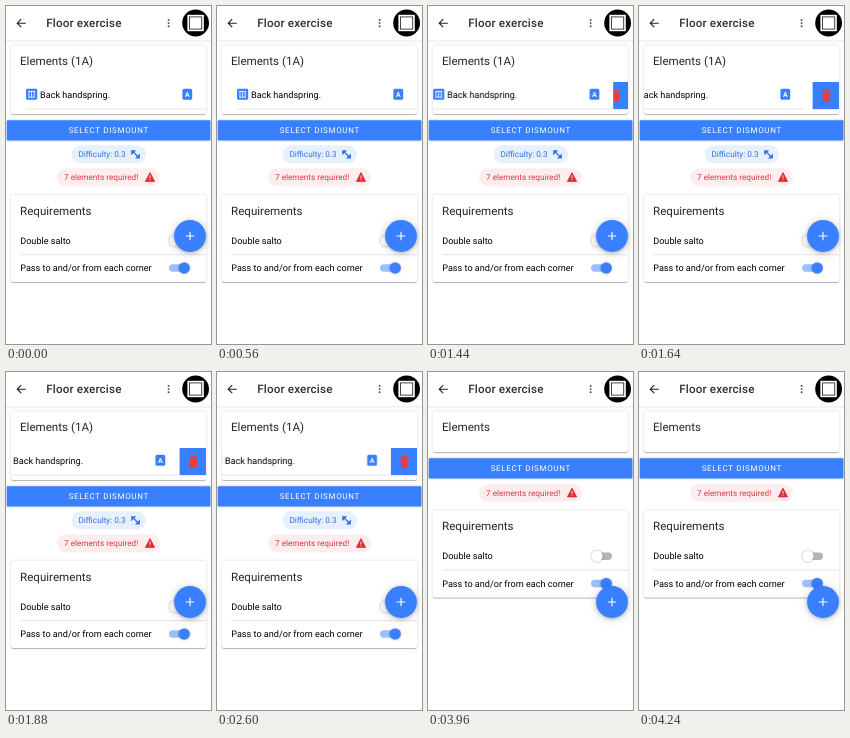
Recreate the animation shown at these times as an HTML page. Size 205x338 px, loop 4640 ms.

```html
<!DOCTYPE html>
<html lang="en">
<head>
<meta charset="utf-8">
<title>Floor exercise</title>
<style>
  html, body { margin: 0; width: 100%; height: 100%; overflow: hidden; background: #fff; }
  svg { display: block; width: 205px; height: 338px; font-family: Roboto, "Open Sans", sans-serif; text-rendering: geometricPrecision; }
  .card { fill: #fff; filter: drop-shadow(0 1px .7px rgba(0,0,0,.22)) drop-shadow(0 .4px 1.6px rgba(0,0,0,.16)); }
  .bar { fill: #fff; filter: drop-shadow(0 .7px 1px rgba(0,0,0,.2)); }
  .fab { fill: #3880ff; filter: drop-shadow(0 1.6px 1.5px rgba(0,0,0,.2)) drop-shadow(0 1.6px 4.5px rgba(0,0,0,.2)); }
  .knob { filter: drop-shadow(0 .7px .8px rgba(0,0,0,.35)); }
  .title { font-size: 11.65px; font-weight: 500; letter-spacing: .0125em; fill: #303030; }
  .head { font-size: 11.6px; fill: #262626; }
  .item { font-size: 9.12px; }
  .chip { font-size: 8.2px; }
  .caps { font-size: 8px; letter-spacing: .085em; fill: #fff; text-anchor: middle; }
  .badge { font-size: 7px; font-weight: 700; fill: #fff; text-anchor: middle; }
  .rule { stroke: #dcdcdc; stroke-width: .7; }
  .blue { fill: #3880ff; }
  .red { fill: #f03a3a; }

  .before, .after, .button, .lower, .slide { animation: 4640ms infinite step-end; }
  .before { animation-name: leave; }
  .after { animation-name: enter; }
  .button { animation-name: rise-button; }
  .lower { animation-name: rise-lower; }
  .slide { animation-name: swipe; animation-timing-function: linear; }

  /* the row is deleted at 2920 ms */
  @keyframes leave { 0% { visibility: visible; } 62.931%, 100% { visibility: hidden; } }
  @keyframes enter { 0% { visibility: hidden; } 62.931%, 100% { visibility: visible; } }
  @keyframes rise-button { 0% { transform: none; } 62.931%, 100% { transform: translateY(-28px); } }
  @keyframes rise-lower { 0% { transform: none; } 62.931%, 100% { transform: translateY(-50.5px); } }
  /* drag from 1320 ms, release at 1660 ms, settled at 2160 ms */
  @keyframes swipe {
    0%, 28.448% { transform: translateX(0); animation-timing-function: cubic-bezier(.35,.2,.6,1); }
    35.345% { transform: translateX(-35px); }
    35.776% { transform: translateX(-35px); animation-timing-function: cubic-bezier(.36,.66,.04,1); }
    46.552%, 100% { transform: translateX(-26.2px); }
  }
</style>
</head>
<body>
<svg viewBox="0 0 205 338" xmlns="http://www.w3.org/2000/svg">
  <defs><clipPath id="row"><rect x="5" y="75.5" width="195" height="28"/></clipPath></defs>
  <rect width="205" height="338" fill="#fff"/>

  <!-- toolbar -->
  <rect class="bar" x="-5" y="-5" width="215" height="39.5"/>
  <path d="M19.8 17.2H11.4M15.2 13.2L11.2 17.2L15.2 21.2" fill="none" stroke="#222" stroke-width="1.15"/>
  <text class="title" x="40.3" y="21.4">Floor exercise</text>
  <g fill="#444">
    <circle cx="162.6" cy="13.9" r=".95"/><circle cx="162.6" cy="17.1" r=".95"/><circle cx="162.6" cy="20.3" r=".95"/>
  </g>
  <circle cx="189.6" cy="17" r="13.4" fill="#000"/>
  <rect x="181.4" y="8.8" width="16.4" height="16.4" fill="#fff"/>
  <rect x="183.5" y="10.9" width="12.2" height="12.2" fill="#fff" stroke="#333" stroke-width=".9"/>

  <!-- elements card -->
  <g class="before">
    <rect class="card" x="5" y="39.5" width="195" height="68.5" rx="2"/>
    <text class="head" x="14" y="59.3">Elements (1A)</text>
    <g clip-path="url(#row)">
      <rect class="blue" x="173.6" y="76" width="26.4" height="27.3"/>
      <path class="red" d="M183.5 86.4h7.9l-.6 8.4q-.1.9-1 .9h-4.7q-.9 0-1-.9z"/>
      <path class="red" d="M182.8 84.4h2.6l.7-.9h2.7l.7.9h2.6v1.3h-9.3z"/>
      <g class="slide">
        <rect x="5" y="75" width="195" height="29" fill="#fff"/>
        <rect class="blue" x="20" y="82.8" width="11.2" height="11" rx="1.4"/>
        <path d="M23 85.5v5.6M25.6 85.5v5.6M28.2 85.5v5.6M22 85.4h7.2M22 91.2h7.2" stroke="#fff" stroke-width=".85"/>
        <text class="item" x="34" y="92.3">Back handspring.</text>
        <rect class="blue" x="176.4" y="82.8" width="9.8" height="11" rx="1.6"/>
        <text class="badge" x="181.3" y="90.9">A</text>
        <path class="rule" d="M20 103.1H200"/>
      </g>
    </g>
  </g>
  <g class="after">
    <rect class="card" x="5" y="39.5" width="195" height="40.5" rx="2"/>
    <text class="head" x="14" y="59.3">Elements</text>
  </g>

  <g class="button">
    <rect class="blue" x=".8" y="114.2" width="203.6" height="20.4" rx=".8" style="filter:drop-shadow(0 .7px .8px rgba(0,0,0,.25))"/>
    <text class="caps" x="102.8" y="127.4">SELECT DISMOUNT</text>
  </g>

  <!-- difficulty chip -->
  <g class="before">
    <rect x="65.5" y="139.3" width="74.5" height="18" rx="9" fill="#e7f0ff"/>
    <text class="chip" x="72.5" y="151.2" fill="#3171e0">Difficulty: 0.3</text>
    <path d="M127 145.8l5 5" stroke="#3171e0" stroke-width="1.3"/>
    <path d="M125.2 144.2h5l-5 5zM133.9 152.6h-5l5-5z" fill="#3171e0"/>
  </g>

  <g class="lower">
    <rect x="51" y="162.3" width="103" height="18" rx="9" fill="#fdedef"/>
    <text class="chip" x="58" y="174.2" fill="#d93a47">7 elements required!</text>
    <path d="M144 166.6L148.6 175.4H139.4Z" fill="#dd2c36" stroke="#dd2c36" stroke-width=".8" stroke-linejoin="round"/>
    <path d="M144 169.4v3.1M144 173.4v1" stroke="#fdedef" stroke-width=".9"/>

    <rect class="card" x="5" y="189" width="195" height="87" rx="2"/>
    <text class="head" x="14" y="208.6">Requirements</text>
    <text class="item" x="14.2" y="237.8">Double salto</text>
    <rect x="164" y="231" width="20" height="7.4" rx="3.7" fill="#b5b5b5"/>
    <circle class="knob" cx="169" cy="234.7" r="5.6" fill="#fff"/>
    <path class="rule" d="M14 248.6H200"/>
    <text class="item" x="14.2" y="265.3">Pass to and/or from each corner</text>
    <rect x="163" y="258.3" width="20" height="7.4" rx="3.7" fill="#9bbfff"/>
    <circle class="knob blue" cx="178.2" cy="262" r="5.6"/>
  </g>

  <circle class="fab" cx="184" cy="230" r="15.9"/>
  <path d="M184 225.8v8.4M179.8 230h8.4" stroke="#fff" stroke-width="1.1"/>
</svg>
</body>
</html>
```
